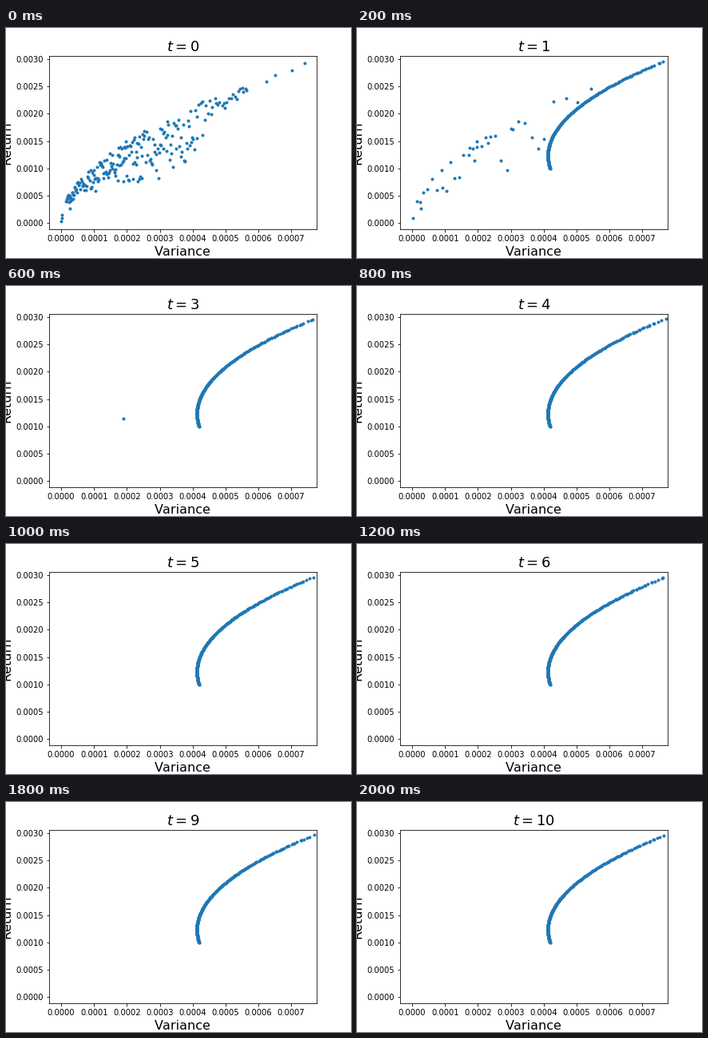
Write a matplotlib script that moves like this. It is 432 by 288 pixels and loops after 2.2 s.

```python
import numpy as np
import matplotlib.pyplot as plt
from matplotlib.animation import FuncAnimation

W, H, DPI = 432, 288, 72
X0, Y0 = 69.1, 244.1            # pixel position of the data origin
SX, SY = 41.15e4, 68.33e3       # pixels per data unit
BEND, X_MIN, Y_MID = .0104, 239, 160   # frontier parabola, in pixels

# Isolated portfolios, in stage pixels, slowest to improve first.
SLOW = np.array([(147, 166), (106, 178), (141, 150), (150, 142), (164, 144),
                 (193, 126), (246, 92), (70, 238), (80, 226)])
TAIL = np.array([(326, 67), (337, 59), (358, 53), (374, 44), (69, 242),
                 (70, 234)])

plt.rcParams["text.kerning_factor"] = 6


def strata(rng, n):
    """Evenly spread random ranks in 0..1."""
    return (np.arange(n) + rng.random(n)) / n


def cloud(n=215):
    """Random portfolios under a square-root curve, left of the frontier."""
    rng = np.random.default_rng(8)
    x = np.interp(strata(rng, n), [0, .09, .19, .34, .6, .75, .87, 1],
                  [75, 86, 105, 130, 175, 210, 240, 303])
    root = np.sqrt(x - 68)
    top = 244 - 11.3 * root
    low = 244 - np.interp(x, [75, 150], [7, 5]) * root
    edge = Y_MID - np.sqrt(np.maximum(x - X_MIN, 0) / BEND)
    low = np.where(x > X_MIN, np.minimum(low, edge), low)
    y = top + (low - top) * rng.beta(1.2, 1.6, n)
    return np.column_stack([x, y])


def frontier(step, n=220):
    """Points on the parabola that the population converges to."""
    rng = np.random.default_rng(40 + step)
    y = 40 + 136.5 * strata(rng, n) ** .74     # sparser towards the top
    return np.column_stack([X_MIN + BEND * (y - Y_MID) ** 2, y])


def population(step):
    if step == 0:
        return np.vstack([SLOW, TAIL, cloud()])
    left = [SLOW, cloud()[::7]] if step == 1 else [SLOW[:{2: 7, 3: 1}.get(step, 0)]]
    return np.vstack([*left, frontier(step)])


fig, ax = plt.subplots(figsize=(W / DPI, H / DPI), dpi=DPI)
fig.subplots_adjust(left=.125, right=.9, bottom=.125, top=.88)
ax.set_xlim((54 - X0) / SX, (388.8 - X0) / SX)
ax.set_ylim((Y0 - 252) / SY, (Y0 - 34.56) / SY)
ax.set_xlabel("Variance", fontsize=16)
ax.set_ylabel("Return", fontsize=16)
title = ax.set_title("$t=0$", fontsize=18)
dots, = ax.plot([], [], ".", color="#1f77b4", markersize=6)


def update(step):
    x, y = population(step).T
    dots.set_data((x - X0) / SX, (Y0 - y) / SY)
    title.set_text(f"$t={step}$")
    return dots, title


anim = FuncAnimation(fig, update, frames=11, interval=200, repeat=True)
plt.show()
```
